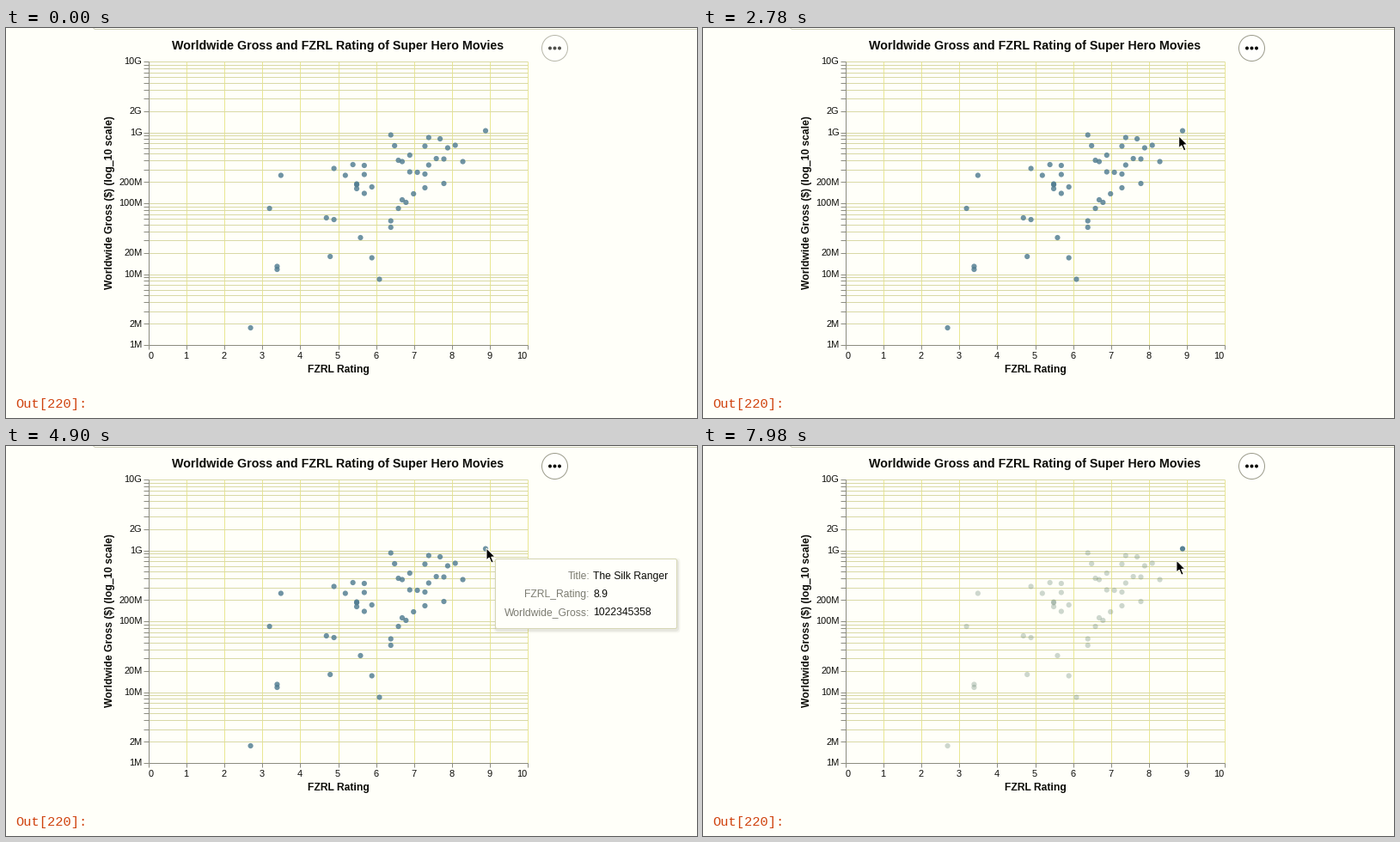
A matplotlib script for the animation above (8000 ms loop, 804x454 px).

```python
import numpy as np
import matplotlib.pyplot as plt
from matplotlib.animation import FuncAnimation
from matplotlib.collections import EllipseCollection, LineCollection
from matplotlib.patches import Circle, FancyBboxPatch, Polygon
from matplotlib.transforms import Affine2D

W, H, DPI = 804, 454, 64  # a power of two keeps the pixel size exact
STEP, LOOP = 40, 8000
PX = 72 / DPI
PAPER, INK = "#fffff9", "#0c0c08"
LEFT, RIGHT, TOP, BOTTOM = 165.5, 606.5, 38.5, 368.5
DOT, FADED = "#4f7b90", "#6f8a78"

plt.rcParams["font.family"] = "Liberation Sans"
fig = plt.figure(figsize=(W / DPI, H / DPI), dpi=DPI, facecolor=PAPER)
ax = fig.add_axes([0, 0, 1, 1])
ax.set_xlim(0, W)
ax.set_ylim(H, 0)
ax.axis("off")


def label(x, y, s, size, color=INK, ha="center", **kw):
    """Text whose capitals are centred on y."""
    return ax.text(x, y + 0.36 * size, s, fontsize=size * PX, color=color,
                   ha=ha, va="baseline", **kw)


def lines(segments, color, z=1):
    ax.add_collection(LineCollection(segments, colors=color, linewidths=PX,
                                     zorder=z))


def x_of(rating):
    return LEFT + rating * (RIGHT - LEFT) / 10


def y_of(millions):
    return BOTTOM - np.log10(millions) * (BOTTOM - TOP) / 4


def crisp(v):
    return np.floor(v) + 0.5


# Axes and grid
xs = [crisp(x_of(i)) for i in range(11)]
ys = [crisp(y_of(m * 10 ** d)) for d in range(4) for m in range(1, 10)]
ys.append(TOP)
lines([[(x, TOP), (x, BOTTOM)] for x in xs], "#e9e793")
lines([[(LEFT, y), (RIGHT, y)] for y in ys], "#d9d9a6", 1.1)
lines([[(x, BOTTOM), (x, BOTTOM + 5.5)] for x in xs]
      + [[(LEFT - 5.5, y), (LEFT, y)] for y in ys]
      + [[(LEFT, TOP), (LEFT, BOTTOM)], [(LEFT, BOTTOM), (RIGHT, BOTTOM)]],
      "#8c8c80", 1.2)

for i in range(11):
    if i == 0:
        label(LEFT, 381, "0", 11, ha="left")
    elif i == 10:
        label(RIGHT, 381, "10", 11, ha="right")
    else:
        label(x_of(i), 381, str(i), 11)
for m in (1, 2, 10, 20, 100, 200, 1000, 2000, 10000):
    name = f"{m}M" if m < 1000 else f"{m // 1000}G"
    label(158.5, y_of(m), name, 11, ha="right")

label(386, 20, "Worldwide Gross and FZRL Rating of Super Hero Movies", 14.3,
      weight="bold")
label(386.5, 397, "FZRL Rating", 12.1, weight="bold")
ax.text(124.3, 203, "Worldwide Gross ($) (log_10 scale)", fontsize=12.1 * PX,
        weight="bold", color=INK, rotation=90, rotation_mode="anchor",
        ha="center", va="baseline")

# Notebook surroundings
label(11.5, 436, "Out[220]:", 15.4, "#d0430f", ha="left",
      family="Liberation Mono")
lines([[(101.5, 0), (103.5, 1.5), (W, 1.5)]], "#cfcfb8")
lines([[(0, 453.5), (W, 453.5)]], "#b4b4a4")

# Menu button
ring = Circle((638.5, 23.5), 15, fc="#fffffc", ec="#9c9c8c", lw=PX, zorder=3)
ax.add_patch(ring)
bullets = [Circle((638.5 + dx, 23.5), 2, fc=INK, lw=0, zorder=4)
           for dx in (-5.5, 0, 5.5)]
for b in bullets:
    ax.add_patch(b)

# Movies: rating -> heights on the stage
movies = {
    2.7: [349], 3.2: [210], 3.4: [277.5, 281], 3.5: [171.5], 4.7: [221],
    4.8: [266], 4.9: [163.5, 223], 5.2: [171.5], 5.4: [159],
    5.5: [181.5, 182.5, 187], 5.6: [244], 5.7: [160, 170.5, 192.5],
    5.9: [185, 267.5], 6.1: [292.5], 6.4: [124.5, 224.5, 232], 6.5: [137],
    6.6: [154, 210], 6.7: [155.5, 200], 6.8: [203], 6.9: [148, 167.5],
    7.0: [193], 7.1: [168], 7.3: [137.5, 170, 186], 7.4: [127.5, 159.5],
    7.6: [152], 7.7: [129], 7.8: [152.5, 181], 7.9: [139.5], 8.1: [136.5],
    8.3: [155.5],
}
spots = [(x_of(r), y) for r, heights in movies.items() for y in heights]


def dots(points):
    c = EllipseCollection([6.2] * len(points), [6.2] * len(points),
                          [0] * len(points), units="xy", offsets=points,
                          offset_transform=ax.transData, facecolors=DOT,
                          linewidths=0, alpha=0.82, zorder=5)
    ax.add_collection(c)
    return c


others = dots(spots)
best = dots([(x_of(8.9), 119.6)])

# Tooltip and pointer, both placed relative to the pointer tip
move = Affine2D()
local = move + ax.transData
tooltip = []
for grow, alpha in ((3, 0.05), (1.5, 0.09)):
    tooltip.append(FancyBboxPatch((10.5 - grow + 1, 12.5 - grow + 2),
                                  211 + 2 * grow, 81 + 2 * grow,
                                  boxstyle="round,pad=0,rounding_size=4",
                                  fc="#555540", alpha=alpha, lw=0, zorder=6))
tooltip.append(FancyBboxPatch((10.5, 12.5), 211, 81,
                              boxstyle="round,pad=0,rounding_size=2",
                              fc="#fffffa", ec="#d6d6b4", lw=PX, zorder=7))
for patch in tooltip:
    patch.set_transform(local)
    ax.add_patch(patch)
rows = [("Title:", "The Silk Ranger"), ("FZRL_Rating:", "8.9"),
        ("Worldwide_Gross:", "1022345358")]
for i, (key, value) in enumerate(rows):
    y = 32 + 21 * i
    tooltip.append(label(120, y, key, 12.1, "#7c7c72", "right",
                         transform=local, zorder=8))
    tooltip.append(label(124, y, value, 12.1, INK, "left",
                         transform=local, zorder=8))

arrow = Polygon([(0, 0), (0, 14), (3.2, 11), (5.8, 17), (8.2, 16),
                 (5.7, 10.2), (10, 10)], closed=True, fc="#000000",
                ec="#fffff4", lw=PX, transform=local, zorder=10)
ax.add_patch(arrow)

# Pointer path: time, x, y
path = np.array([
    (440, 500, 458), (720, 520.5, 341), (860, 528, 300), (1120, 547, 190),
    (1320, 556, 148), (1560, 557.5, 134.5), (2400, 557, 133),
    (2600, 555, 128), (2780, 553.5, 125.5), (3340, 554, 125),
    (3560, 558, 122), (3780, 560.5, 119), (4200, 561, 118.5),
    (4600, 559, 119), (5040, 559, 119), (5400, 557.5, 118.5),
    (7600, 557.5, 118.5), (7860, 552, 131), (8000, 550.5, 134),
])


def update(i):
    t = i * STEP
    x, y = (np.interp(t, path[:, 0], path[:, k]) for k in (1, 2))
    move.clear().translate(x, y)
    arrow.set_visible(t >= path[0, 0])
    shown = 3840 <= t < 7700
    for part in tooltip:
        part.set_visible(shown)

    glow = np.interp(t, [720, 1120], [0.72, 1])
    ring.set_alpha(glow)
    for b in bullets:
        b.set_alpha(glow)

    picked = t >= 7040
    others.set_facecolor(FADED if picked else DOT)
    others.set_alpha(0.34 if picked else 0.82)
    best.set_alpha(0.95 if picked else 0.82)
    return []


anim = FuncAnimation(fig, update, frames=LOOP // STEP, interval=STEP,
                     repeat=True, repeat_delay=0, blit=False)
plt.show()
```
